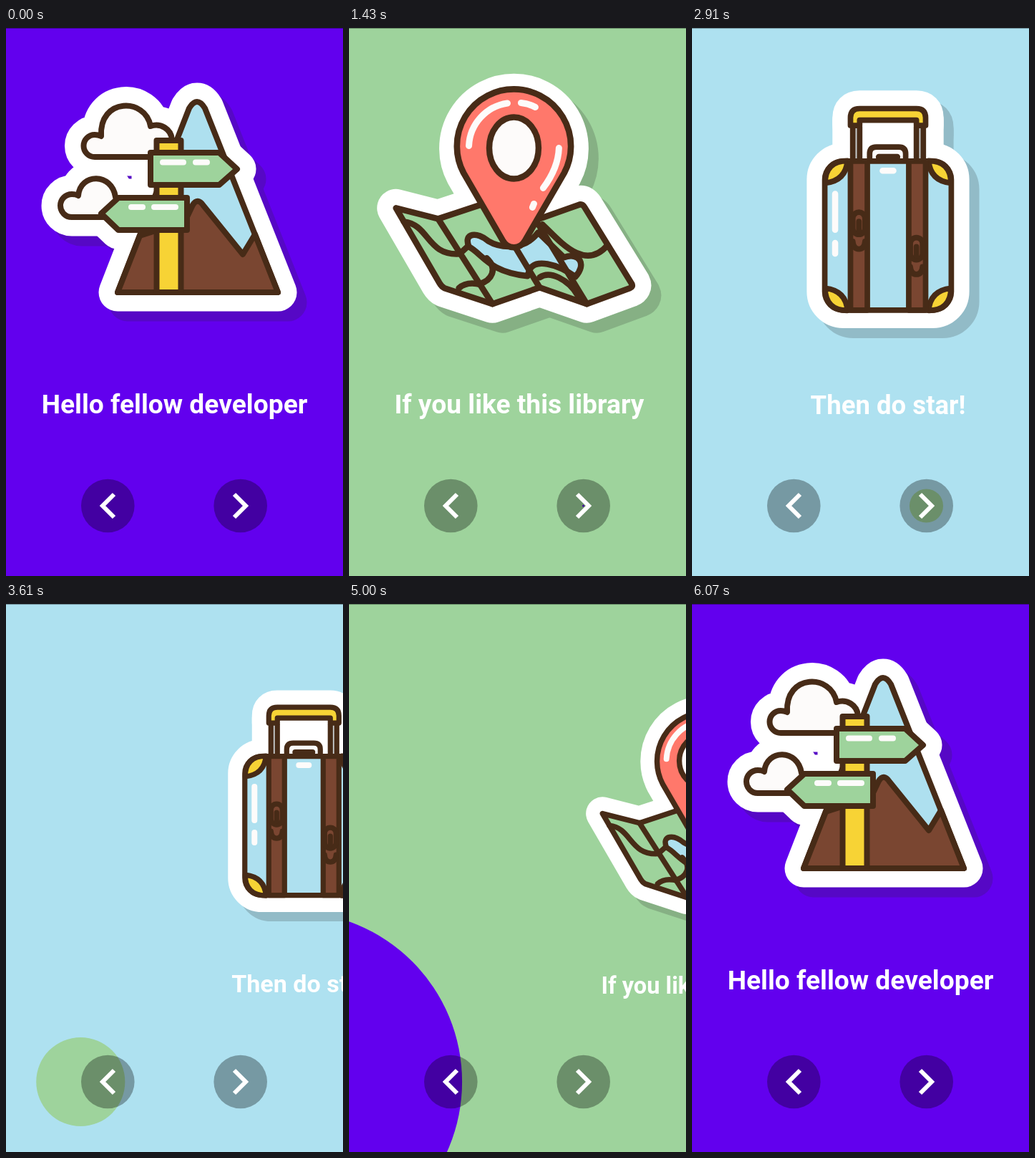
These frames come from a looping animation (471x765 px, 6.12 s). An HTML page:

```html
<!DOCTYPE html>
<html lang="en">
<head>
<meta charset="utf-8">
<title>Onboarding pages</title>
<style>
  html, body { margin: 0; width: 100%; height: 100%; overflow: hidden; }
  svg { display: block; width: 471px; height: 765px; }
  text { font: 700 37.2px Roboto, "Open Sans", sans-serif; fill: #fff; text-anchor: middle; }
  .art { stroke: #472b17; stroke-width: 8; stroke-linejoin: round; stroke-linecap: round; fill: none; }
  .edge, .shade { stroke-width: 53; stroke-linejoin: round; stroke-linecap: round; }
  .edge { fill: #fff; stroke: #fff; }
  .shade { fill: #282828; stroke: #282828; opacity: .2; }
  .shine { stroke: #fdfbfa; stroke-width: 8; }
  .white { fill: #fdfbfa; }
  .green { fill: #9ed39c; }
  .blue { fill: #aee0ef; }
  .brown { fill: #7a4631; }
  .yellow { fill: #f7d335; }
</style>
</head>
<body>
<svg viewBox="0 0 471 765">
  <defs>
    <path id="cloudBig" d="M200 180H124a15.5 15.5 0 0 1 0-31q5 0 9 2C130 97 195 97 202 137C216 132 231 141 232 156"/>
    <path id="cloudSmall" d="M140 264H92a16 16 0 0 1 0-32q6 0 9 2C104 202 148 202 153 236"/>
    <path id="peak" d="M156 369L256 112Q267 94 278 112L380 369Z"/>
    <path id="signTop" d="M202 174H298L323 197L298 219H202Z"/>
    <path id="signLow" d="M253 237H157L133 259L157 282H253Z"/>
    <g id="trail">
      <use href="#cloudBig"/><use href="#cloudSmall"/><use href="#peak"/>
      <use href="#signTop"/><use href="#signLow"/>
    </g>

    <path id="pin" d="M211 297L157 204A78 78 0 1 1 295 204L241 297A17 17 0 0 1 211 297Z"/>
    <path id="sheet" d="M61 251L120 266L190 243L262 266L318 246Q322 245 325 250L391 357Q393 361 388 363L328 385L262 362L196 385L129 363Q125 361 122 356Z"/>
    <g id="map"><use href="#pin"/><use href="#sheet"/></g>

    <rect id="body" x="334.5" y="213.5" width="165" height="194" rx="24"/>
    <path id="grip" d="M368 167V157Q368 145 380 145H454Q466 145 466 157V167H454V160H380V167Z"/>
    <g id="case"><use href="#body"/><use href="#grip"/><path d="M368 160H466V220H368Z"/></g>
    <path id="corner" d="M335 242Q335 213 364 213Q362 239 335 242Z"/>
    <g id="buckle">
      <rect x="371" y="280" width="16" height="29" rx="8"/>
      <path d="M379 292V304M371 318Q372 328 379 328Q386 328 387 318"/>
    </g>
    <path id="rod" d="M371 168V213M380 168V213"/>
  </defs>

  <rect id="back" width="471" height="765"/>
  <circle id="disc" cy="667"/>

  <g class="page">
    <use href="#trail" class="shade" x="14" y="14"/>
    <use href="#trail" class="edge"/>
    <g class="art">
      <use href="#cloudBig" class="white"/>
      <use href="#cloudSmall" class="white"/>
      <use href="#peak" class="blue"/>
      <path class="brown" d="M156 369L187 290L250 270L261 247Q268 236 276 248L331 316L348 288L380 369Z"/>
      <rect class="yellow" x="210.500" y="157" width="34" height="212"/>
      <path d="M210 174H245"/>
      <use href="#signTop" class="green"/>
      <use href="#signLow" class="green"/>
      <path class="shine" d="M219 187.500H248M265 187.500H281M175 250H191M207 250H237"/>
    </g>
    <text x="235.500" y="538">Hello fellow developer</text>
  </g>

  <g class="page">
    <g transform="translate(2 0)">
      <use href="#map" class="shade" x="14" y="14"/>
      <use href="#map" class="edge"/>
      <g class="art" style="stroke-width:8.5">
        <use href="#sheet" class="green"/>
        <path class="blue" d="M163 305C155 285 175 284 190 297C205 306 240 312 260 285L296 320C318 312 328 330 312 347C285 328 256 322 248 337L245 346C190 340 182 315 163 305Z"/>
        <path d="M120 266L196 385M190 243L262 362M258 270L328 385"/>
        <path d="M72 270C108 274 104 318 150 315L162 304M188 321C204 336 195 352 178 357M149 363Q160 353 180 358"/>
        <path d="M266 274C290 297 325 340 357 303M262 348C276 338 302 350 316 374"/>
        <use id="marker" href="#pin" fill="#ff786b"/>
        <ellipse id="hole" class="white" cx="226" cy="167" ry="43"/>
        <path class="shine" style="stroke-width:9" d="M163 164A63 63 0 0 1 217 104.500M236 104Q247 105 256 110M289 167Q288 195 267 223M254 245L252 250"/>
      </g>
    </g>
    <text x="235.500" y="538">If you like this library</text>
  </g>

  <g class="page">
    <g transform="translate(235.500 584) scale(1.091) translate(-417 -585)">
      <use href="#case" class="shade" style="stroke-width:47" x="13" y="13"/>
      <use href="#case" class="edge" style="stroke-width:47"/>
      <g class="art" style="stroke-width:7.2">
        <g stroke-linecap="butt">
          <path stroke="#c9cfd0" stroke-width="4" d="M375.500 168V213M458.500 168V213"/>
          <use href="#rod"/><use href="#rod" x="83"/>
        </g>
        <use href="#grip" class="yellow"/>
        <path class="white" d="M393 213V204Q393 195 402 195H431Q440 195 440 204V213"/>
        <path stroke-width="8" d="M405 208H429"/>
        <use href="#body" class="blue"/>
        <g class="yellow">
          <use href="#corner"/>
          <use href="#corner" transform="translate(834 0) scale(-1 1)"/>
          <use href="#corner" transform="translate(0 621) scale(1 -1)"/>
          <use href="#corner" transform="translate(834 621) scale(-1 -1)"/>
        </g>
        <path class="brown" d="M368 213.500H390V407.500H368ZM444 213.500H466V407.500H444Z"/>
        <use href="#buckle"/><use href="#buckle" x="75" y="33"/>
        <path class="shine" d="M348 256V303M348 320V334M410 226H424"/>
      </g>
    </g>
    <text x="235.500" y="538">Then do star!</text>
  </g>

  <g fill-opacity=".32">
    <circle cx="142.300" cy="667" r="37.300"/>
    <circle cx="327.700" cy="667" r="37.300"/>
  </g>
  <path fill="none" stroke="#fff" stroke-width="6" d="M151 651L135 667L151 683M319 651L335 667L319 683"/>
  <rect width="471" height="1" fill-opacity=".35"/>
</svg>
<script>
const LOOP = 6120, SLIDE = 940, WIDTH = 471, BUTTON = 37.5;
const colors = ['#6200ee', '#9ed39c', '#aee1f0'];
const moves = [ // start, from, to
  { at: 539, from: 0, to: 1 },
  { at: 2161, from: 1, to: 2 },
  { at: 3516, from: 2, to: 1 },
  { at: 4855, from: 1, to: 0 },
];
const $ = id => document.getElementById(id);
const pages = document.querySelectorAll('.page');
const back = $('back'), disc = $('disc'), marker = $('marker'), hole = $('hole');

function placePage(page, shift) {
  page.style.display = Math.abs(shift) < 1.2 ? '' : 'none';
  const scale = 1 - .217 * Math.abs(shift);
  page.setAttribute('transform',
    `translate(${235.5 + shift * WIDTH} 585) scale(${scale}) translate(-235.5 -585)`);
}

// Grows from the button's centre to its size, then swells towards a straight edge.
function discShape(s) {
  if (s < .13) return { r: BUTTON * s / .13, offset: 0 };
  const v = (Math.sqrt(.36 + 1.08 * (s - .13)) - .6) / .54;
  const r = BUTTON + 2 ** (12.5 * v + v * v) - 1;
  return { r, offset: r - BUTTON * (1 - v) };
}

// The pin stands a little taller, with a narrow hole, on the first visit.
function posePin(tall) {
  const k = tall ? 1.022 : 1;
  marker.setAttribute('transform', `translate(226 308) scale(${k}) translate(-226 -308)`);
  hole.setAttribute('rx', tall ? 34.5 : 42.5);
}

function draw(t) {
  const { at, from, to } = moves.findLast(m => m.at <= t) || { at: -SLIDE, from: 1, to: 0 };
  const left = 1 - Math.min(1, (t - at) / SLIDE);
  const p = 1 - left * left;
  const dir = to - from, growing = p < .5;

  pages.forEach((page, i) => placePage(page,
    i === to ? dir * 2 * (1 - p) : i === from ? -dir * 2 * p : 9));

  const { r, offset } = discShape(2 * Math.min(p, 1 - p));
  back.setAttribute('fill', colors[growing ? from : to]);
  disc.setAttribute('fill', colors[growing ? to : from]);
  disc.setAttribute('r', r);
  disc.setAttribute('cx', (dir > 0 ? 327.5 : 142.5) + (growing ? dir : -dir) * offset);

  posePin(t < moves[2].at);
}

const start = performance.now();
function tick() {
  draw((performance.now() - start) % LOOP);
  requestAnimationFrame(tick);
}
tick();
</script>
</body>
</html>
```
